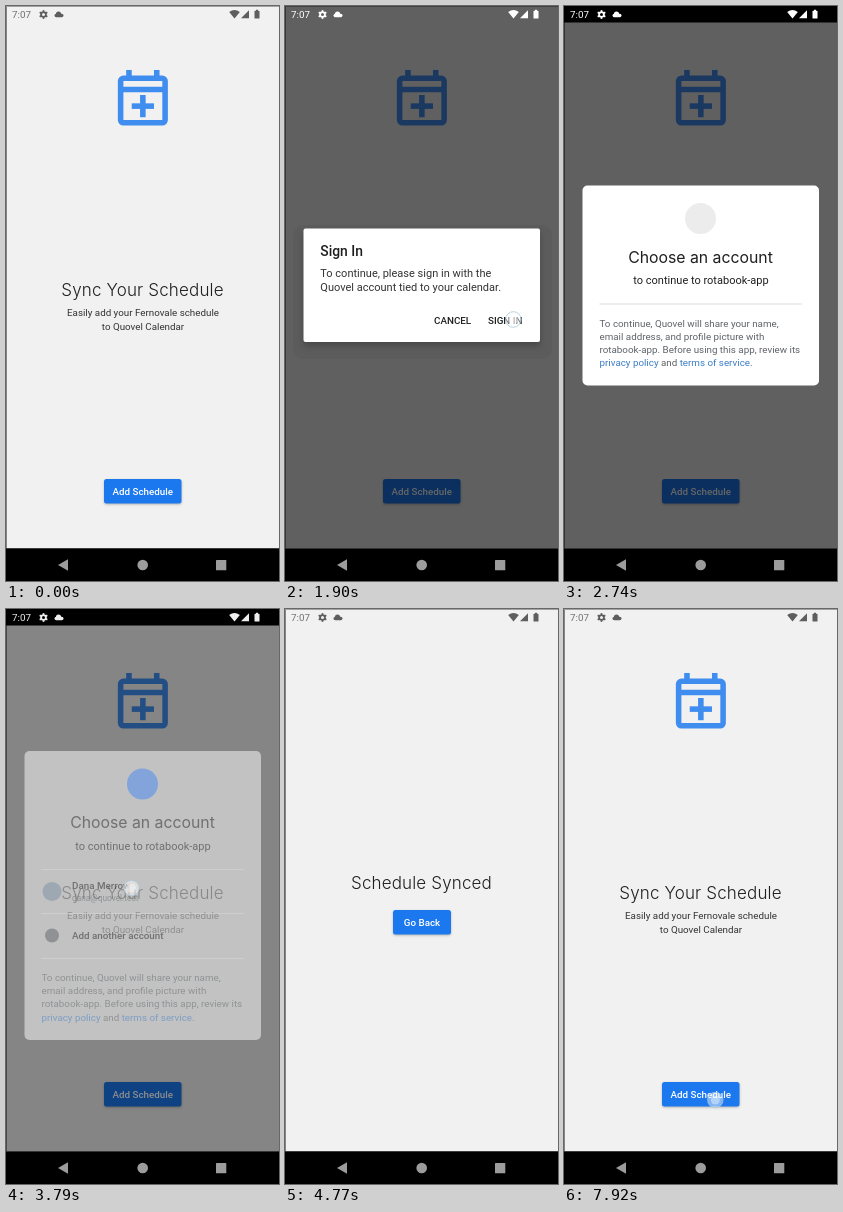
Write an HTML page with a canvas that moves like this. It is 273 by 575 pixels and loops after 7.99 s.

```html
<!DOCTYPE html>
<html lang="en">
<head>
<meta charset="utf-8">
<title>Sync Your Schedule</title>
<style>
html, body { margin: 0; width: 100%; height: 100%; overflow: hidden; background: #f1f1f1; }
canvas { display: block; width: 273px; height: 575px; }
</style>
</head>
<body>
<canvas id="stage"></canvas>
<script>
const W = 273, H = 575, LOOP = 7990, STEP = 70;
const MID = 136.5, TOP = 16.5, NAV = 542.2;
const ROBOTO = 'Roboto, sans-serif', INTER = 'Inter, sans-serif';
const SMALL = 9.8, BODY = 11.03;
const BLUE = '#1b78ee';
const canvas = document.getElementById('stage');
const ctx = canvas.getContext('2d');
const dpr = window.devicePixelRatio || 1;
canvas.width = W * dpr;
canvas.height = H * dpr;

const clamp = v => Math.max(0, Math.min(1, v));
const ramp = (t, a, b) => clamp((t - a) / (b - a));
const lerp = (a, b, p) => a + (b - a) * p;
const easeOut = (p, n = 2) => 1 - (1 - p) ** n;

function box(x, y, w, h, color, r = 0) {
  ctx.fillStyle = color;
  ctx.beginPath();
  ctx.roundRect(x, y, w, h, r);
  ctx.fill();
}

function disc(x, y, r, color) {
  ctx.fillStyle = color;
  ctx.beginPath();
  ctx.arc(x, y, r, 0, Math.PI * 2);
  ctx.fill();
}

function ring(x, y, r, width, color) {
  ctx.strokeStyle = color;
  ctx.lineWidth = width;
  ctx.beginPath();
  ctx.arc(x, y, r, 0, Math.PI * 2);
  ctx.stroke();
}

function shape(color, ...pts) {
  ctx.fillStyle = color;
  ctx.beginPath();
  pts.forEach(([x, y]) => ctx.lineTo(x, y));
  ctx.fill();
}

function text(str, x, y, size, { color = '#1f1f1f', weight = 400, font = ROBOTO, gap = 0, align = 'left' } = {}) {
  ctx.font = `${weight} ${size}px ${font}`;
  ctx.letterSpacing = gap + 'px';
  ctx.textAlign = align;
  ctx.fillStyle = color;
  ctx.fillText(str, x, y);
  return ctx.measureText(str).width;
}

// Draws a layer faded and scaled about the middle of the content area.
function layer(alpha, scale, draw, cy = 279.5) {
  if (alpha <= 0) return;
  ctx.save();
  ctx.globalAlpha = alpha;
  ctx.translate(MID, cy);
  ctx.scale(scale, scale);
  ctx.translate(-MID, -cy);
  draw();
  ctx.restore();
}

function withShadow(color, blur, dy, draw) {
  ctx.save();
  ctx.shadowColor = color;
  ctx.shadowBlur = blur * dpr;
  ctx.shadowOffsetY = dy * dpr;
  draw();
  ctx.restore();
}

function heading(str, y) {
  text(str, MID, y, 17, { weight: 300, font: INTER, gap: .15, align: 'center' });
}

function button(label, x, y, w, pressed) {
  withShadow('rgba(0,0,0,.25)', 2.5, 1, () => box(x, y, w, 24.5, BLUE, 2.5));
  if (pressed) box(x, y, w, 24.5, 'rgba(255,255,255,.16)', 2.5);
  text(label, x + w / 2, y + 16.2, SMALL, { color: '#fff', weight: 500, align: 'center' });
}

function calendarIcon() {
  ctx.save();
  ctx.translate(103.5, 61.2);
  ctx.scale(2.78, 2.78);
  ctx.fillStyle = '#408df0';
  ctx.beginPath();
  ctx.roundRect(3, 3, 18, 18, 2);
  ctx.rect(5, 5, 14, 2);
  ctx.rect(5, 9, 14, 10);
  ctx.fill('evenodd');
  for (const [x, y, w, h] of [[6, 1, 2, 2.2], [16, 1, 2, 2.2], [11, 10, 2, 8], [8, 13, 8, 2]]) {
    ctx.fillRect(x, y, w, h);
  }
  ctx.restore();
}

function home(pressed) {
  const line = { color: '#333', align: 'center' };
  calendarIcon();
  heading('Sync Your Schedule', 290);
  text('Easily add your Fernovale schedule', 137, 310.3, SMALL, line);
  text('to Quovel Calendar', 137, 324.3, SMALL, line);
  button('Add Schedule', 98, 473, 77.5, pressed);
}

function result(pressed) {
  heading('Schedule Synced', 280);
  button('Go Back', 108, 301, 58, pressed);
}

function signIn() {
  const body = { color: '#333' };
  const action = { weight: 500 };
  box(8, 219, 259, 134, 'rgba(0,0,0,.04)', 10);
  withShadow('rgba(0,0,0,.22)', 6, 4, () => box(18.5, 222.5, 236.5, 113.5, '#fff', 2));
  text('Sign In', 35.3, 250, 13.9, { weight: 500 });
  text('To continue, please sign in with the', 35.3, 271.3, BODY, body);
  text('Quovel account tied to your calendar.', 35.3, 284.5, BODY, body);
  text('CANCEL', 149, 318.2, SMALL, action);
  text('SIGN IN', 203, 318.2, SMALL, action);
}

function accounts(t) {
  const grow = easeOut(ramp(t, 2740, 3090));
  const top = lerp(179.5, 142, grow), bottom = lerp(379.5, 431, grow);
  const upper = top + 118.5, lower = bottom - 81.5;
  const note = { color: '#5f6368' };
  const link = { color: '#3b7cc9' };
  const rule = y => box(35.5, y - .5, 202.5, 1, '#dadce0');

  box(18.5, top, 236.5, bottom - top, '#fff', 5);
  if (t >= 2740) disc(MID, top + 33, 15.5, grow > .5 ? '#4285f4' : '#ececec');
  text('Choose an account', MID, top + 77, 15.8, { font: INTER, align: 'center' });
  text('to continue to rotabook-app', 137, top + 98.5, BODY, { align: 'center' });

  ctx.save();
  ctx.beginPath();
  ctx.rect(18, upper, 237, lower - upper);
  ctx.clip();
  disc(46, upper + 22, 9.5, '#7a8fa6');
  text('Dana Merrow', 66, upper + 19.5, SMALL, { weight: 500 });
  text('dana@quovel.test', 66, upper + 31.5, 8.3, note);
  rule(upper + 44);
  disc(46, upper + 66, 7, '#5f6368');
  text('Add another account', 66, upper + 69.5, SMALL, { weight: 500 });
  ctx.restore();
  rule(upper);
  if (lower - upper > 1) rule(lower);

  const y = lower + 22.5;
  text('To continue, Quovel will share your name,', 35.5, y, SMALL, note);
  text('email address, and profile picture with', 35.5, y + 13.2, SMALL, note);
  text('rotabook-app. Before using this app, review its', 35.5, y + 26.4, SMALL, note);
  let x = 35.5;
  for (const [str, style] of [['privacy policy', link], [' and ', note], ['terms of service', link], ['.', note]]) {
    x += text(str, x, y + 39.6, SMALL, style);
  }
}

function statusBar(dim, black) {
  const g = Math.round(lerp(185, 255, dim / .6));
  const lit = dim > 0 && `rgb(${g},${g},${g})`;
  const c = lit || '#5e5e5e';
  if (black) box(0, 0, W, TOP, '#000');
  text('7:07', 6, 11.8, SMALL, { color: lit || '#707070' });

  ring(37.5, 8.5, 2.4, 1.8, c);
  ctx.lineWidth = 1.7;
  for (let i = 0; i < 6; i++) {
    const a = (i + .5) * Math.PI / 3, x = Math.cos(a), y = Math.sin(a);
    ctx.beginPath();
    ctx.moveTo(37.5 + 2.6 * x, 8.5 + 2.6 * y);
    ctx.lineTo(37.5 + 4.4 * x, 8.5 + 4.4 * y);
    ctx.stroke();
  }
  box(48.5, 7.8, 9, 3.4, c, 1.7);
  disc(52.5, 8, 2.6, c);

  ctx.fillStyle = c;
  ctx.beginPath();
  ctx.moveTo(228.5, 12.5);
  ctx.lineTo(223.2, 6);
  ctx.quadraticCurveTo(228.5, 2.2, 233.8, 6);
  ctx.fill();
  shape(c, [235, 12.3], [243, 12.3], [243, 4.3]);
  box(248.5, 4.8, 5, 7.8, c, .6);
  box(250, 3.8, 2, 1.2, c);
}

function navBar() {
  const c = '#9c9c9c';
  box(0, NAV, W, H - NAV, '#000');
  shape(c, [52, 559], [62, 553.3], [62, 564.7]);
  disc(136.7, 559, 5.3, c);
  box(210, 554, 10.3, 10.3, c, .6);
}

function touch(t, start, x, y) {
  const age = t - start;
  if (age < 0 || age >= 560) return;
  ctx.save();
  ctx.globalAlpha = 1 - ramp(age, 280, 560);
  disc(x, y, 8, 'rgba(255,255,255,.45)');
  if (age < 350) {
    ring(x, y, 7.8, 1, 'rgba(150,190,208,.65)');
    disc(x, y, 4.5, 'rgba(255,255,255,.4)');
  }
  ctx.restore();
}

function dimAt(t) {
  if (t < 2110) return .6 * ramp(t, 640, 1060);
  if (t < 2320) return lerp(.6, .1, ramp(t, 2110, 2320));
  return lerp(.1, .6, ramp(t, 2320, 2530)) * (1 - ramp(t, 3650, 4210));
}

function draw(t) {
  const dim = dimAt(t);
  ctx.setTransform(dpr, 0, 0, dpr, 0, 0);
  box(0, 0, W, H, '#f1f1f1');

  const open = ramp(t, 4490, 4770), close = ramp(t, 5890, 6170);
  if (close > 0) {
    layer(1 - close, 1 - .1 * easeOut(close), () => result(true));
    layer(close, 1 + .1 * (1 - close) ** 2, () => home(false));
  } else {
    layer(1 - open, 1 + .15 * easeOut(open, 3), () => home(t >= 570 && t < 850));
    layer(open, lerp(.85, 1, easeOut(open, 3)), () => result(t >= 5610));
  }

  box(0, 0, 1, NAV, '#858585');
  box(0, 0, W, 1, '#a2a2a2');
  if (dim > 0) box(0, 0, W, NAV, `rgba(0,0,0,${dim})`);
  statusBar(dim, t >= 2250 && t < 4210);

  const enter = easeOut(ramp(t, 640, 1060));
  layer(enter * (1 - ramp(t, 2110, 2320)), lerp(.9, 1, enter), signIn);
  layer(ramp(t, 2320, 2530) * (1 - ramp(t, 3650, 3930)), 1, () => accounts(t));
  navBar();

  touch(t, 500, 150, 487);
  touch(t, 1900, 228.3, 313.5);
  touch(t, 3510, 125.5, 279);
  touch(t, 5610, 140, 314);
  touch(t, 7920, 151.3, 491);
}

const begin = performance.now();
function tick() {
  const t = (performance.now() - begin) % LOOP;
  draw(Math.max(0, Math.floor((t - 10) / STEP) * STEP + 10));
  requestAnimationFrame(tick);
}
tick();
</script>
</body>
</html>
```
